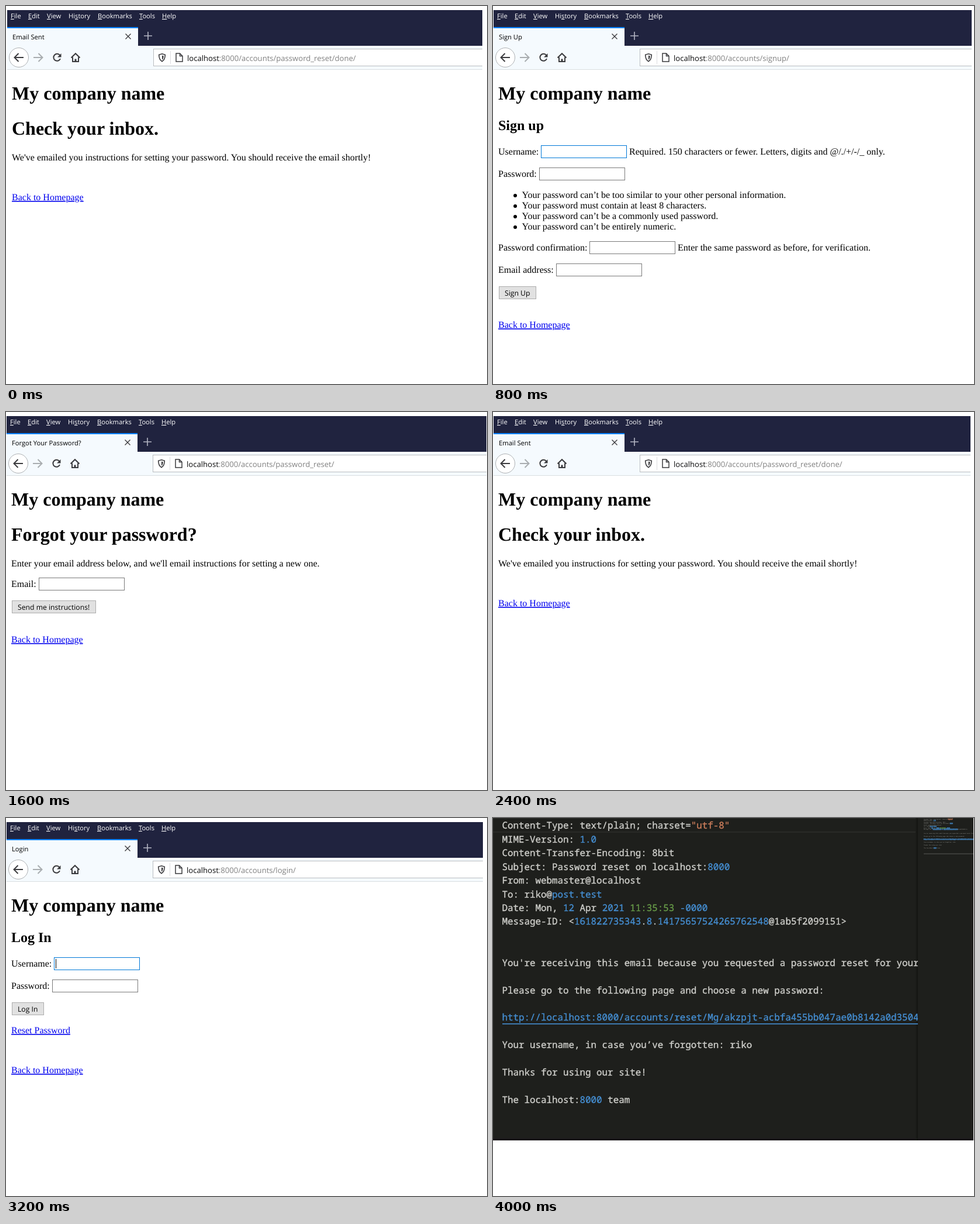
An HTML page that plays this animation: 823 px wide and 646 px high, repeating every 4.8 s.

```html
<!DOCTYPE html>
<html lang="en">
<head>
<meta charset="utf-8">
<title>Password reset walkthrough</title>
<style>
  html, body { margin: 0; width: 100%; height: 100%; overflow: hidden; background: #fff; }
  svg { display: block; width: 823px; height: 646px; }
  text { white-space: pre; text-rendering: geometricPrecision; }
  .ui { font-family: "Open Sans", "Noto Sans", sans-serif; }
  .page { font-family: "Liberation Serif", "Times New Roman", serif; }
  .mono { font-family: "Noto Sans Mono", "DejaVu Sans Mono", monospace; }
  .bold { font-weight: bold; }
  .key, .link { text-decoration: underline; }
  .link { fill: #00e; }
  .icon { fill: none; stroke: #3b3b3e; stroke-width: 2; }
</style>
</head>
<body>
<svg id="stage" viewBox="0 0 823 646" xmlns="http://www.w3.org/2000/svg"></svg>
<script>
const STEP = 800;

const rect = (x, y, w, h, fill, stroke = 'none') =>
  `<rect x="${x}" y="${y}" width="${w}" height="${h}" fill="${fill}" stroke="${stroke}"/>`;
const text = (x, y, size, str, cls = 'page', fill = '#000') =>
  `<text x="${x}" y="${y}" font-size="${size}" class="${cls}" fill="${fill}">${str}</text>`;
const path = (d, attrs = '') => `<path class="icon" d="${d}" ${attrs}/>`;
const tint = (color, str) => `<tspan fill="${color}" stroke="${color}">${str}</tspan>`;

// Page elements
const para = (y, str, x = 9) => text(x, y, 16, str);
const link = (y, str) => `<text x="9" y="${y}" font-size="16" class="page link">${str}</text>`;
const home = y => link(y, 'Back to Homepage');
const h1 = (y, str) => text(9, y, 32, str, 'page bold');
const h2 = str => text(9, 212, 24, str, 'page bold');
const input = (x, y, stroke = '#7a7a7a') => rect(x + .5, y + .5, 146, 21, '#fff', stroke);
const button = (y, w, str) =>
  rect(10.5, y + .5, w - 1, 21, '#e1e1e1', '#adadad') + text(20, y + 16, 12.2, str, 'ui');
const bullet = (y, str) => `<circle cx="38" cy="${y - 4}" r="3"/>` + para(y, str, 49.5);
const logins = () =>
  para(254, 'Username:') + input(82, 238, '#0078d7') + para(292, 'Password:') + input(79, 276);

const MENU = [
  [7, '', 'F', 'ile'], [37, '', 'E', 'dit'], [69, '', 'V', 'iew'], [106, 'Hi', 's', 'tory'],
  [156, '', 'B', 'ookmarks'], [227, '', 'T', 'ools'], [266, '', 'H', 'elp']
];

function icons() {
  return '<circle cx="21" cy="88" r="16.5" fill="#fff" stroke="#adb0b3"/>' +
    path('M29 88H14M20.5 81L13.5 88L20.5 95') +
    path('M46 88H61M54.5 81L61.5 88L54.5 95', 'style="stroke:#a9adb0"') +
    path('M91.2 84.2A6 6 0 1 0 92 90') +
    path('M93.5 81V87.5H87Z', 'style="fill:#3b3b3e;stroke:none"') +
    path('M110.5 88.5L118 81.2L125.5 88.5M113 87.5V95H123V87.5') +
    path('M118 95V90.5', 'style="stroke-width:3"') +
    path('M266 81.8L271.3 83.3C271.3 89 270 92.5 266 94.8C262 92.5 260.7 89 260.7 83.3Z',
      'style="stroke-width:1.6"') +
    path('M266 84.5V92C268 90.5 268.7 88 268.7 85.2Z', 'style="fill:#3b3b3e;stroke:none"') +
    path('M290 81H296.5L301 85.5V95H290ZM296.5 81V85.5H301', 'style="stroke-width:1.5"') +
    path('M203.5 47.5L212.5 56.5M212.5 47.5L203.5 56.5', 'style="stroke-width:1.4"') +
    path('M235 51H249M242 44V58', 'style="stroke:#b4b6c4;stroke-width:1.6"');
}

function browser({ title, url, right, shift = 0, body }) {
  const r = right - shift;
  const menu = MENU.map(([x, pre, key, post]) =>
    text(x, 21, 11.15, `${pre}<tspan class="key">${key}</tspan>${post}`, 'ui', '#fff')).join('');
  return `<g transform="translate(${shift})">` +
    rect(1, 7, r - 1, 61, '#20233f') +
    rect(1, 36, 224, 32, '#f5fafe') + rect(1, 36, 224, 2, '#0a84ff') +
    rect(1, 68, r - 1, 40, '#f5fafe') + rect(1, 108, r - 1, 1, '#d9dee1') +
    rect(251, 73, r - 251, 30, '#b9bcbf') + rect(252, 74, r - 252, 28, '#fff') +
    rect(280, 77, 1, 22, '#dcdcde') +
    menu + text(10, 57, 11.2, title, 'ui') + icons() +
    text(309, 94, 13.08, `localhost<tspan fill="#818181">:8000/accounts/${url}/</tspan>`, 'ui', '#0c0c0d') +
    h1(160, 'My company name') + body + '</g>';
}

const sent = (right, shift) => browser({
  title: 'Email Sent', url: 'password_reset/done', right, shift,
  body: h1(220, 'Check your inbox.') +
    para(264, "We've emailed you instructions for setting your password. You should receive the email shortly!") +
    home(332)
});

const signup = () => browser({
  title: 'Sign Up', url: 'signup', right: 819,
  body: h2('Sign up') + logins() +
    para(254, 'Required. 150 characters or fewer. Letters, digits and @/./+/-/_ only.', 233) +
    bullet(328, 'Your password can’t be too similar to your other personal information.') +
    bullet(346, 'Your password must contain at least 8 characters.') +
    bullet(364, 'Your password can’t be a commonly used password.') +
    bullet(382, 'Your password can’t be entirely numeric.') +
    para(418, 'Password confirmation:') + input(165, 402) +
    para(418, 'Enter the same password as before, for verification.', 316) +
    para(456, 'Email address:') + input(108, 440) +
    button(479, 64, 'Sign Up') + home(550)
});

const forgot = () => browser({
  title: 'Forgot Your Password?', url: 'password_reset', right: 822,
  body: h1(220, 'Forgot your password?') +
    para(264, "Enter your email address below, and we'll email instructions for setting a new one.") +
    para(299, 'Email:') + input(56, 283) +
    button(322, 144, 'Send me instructions!') + home(394)
});

const login = () => browser({
  title: 'Login', url: 'login', right: 816,
  body: h2('Log In') + logins() + rect(85, 241, 1, 16, '#000') +
    button(315, 55, 'Log In') + link(368, 'Reset Password') + home(436)
});

// Email in a code editor
const BLUE = '#458fd3';
const blue = str => tint(BLUE, str);
const MAIL = [
  `Content-Type: text/plain; charset=${tint('#ce7f5c', '"utf-8"')}`,
  `MIME-Version: ${blue('1.0')}`,
  'Content-Transfer-Encoding: 8bit',
  `Subject: Password reset on localhost:${blue('8000')}`,
  'From: webmaster@localhost',
  `To: riko@${blue('post.test')}`,
  `Date: Mon, ${blue('12')} Apr ${blue('2021')} ${tint('#679b48', '11:35:53')} ${blue('-0000')}`,
  `Message-ID: &lt;${blue('161822735343')}.${blue('8')}.${blue('14175657524265762548')}@1ab5f2099151&gt;`,
  '', '',
  "You're receiving this email because you requested a password reset for your",
  '',
  'Please go to the following page and choose a new password:',
  '',
  blue('http://localhost:8000/accounts/reset/Mg/akzpjt-acbfa455bb047ae0b8142a0d3504'),
  '',
  'Your username, in case you’ve forgotten: riko',
  '',
  'Thanks for using our site!',
  '',
  `The localhost:${blue('8000')} team`
];

const mail = (x, y, size, pitch) =>
  MAIL.map((row, i) => row && text(x, y + i * pitch, size, row, 'mono', '#d0d0cc')).join('');

const editor = () =>
  '<clipPath id="pane"><rect width="727" height="551"/></clipPath>' +
  '<clipPath id="map"><rect x="727" width="95" height="551"/></clipPath>' +
  rect(0, 0, 822, 551, '#1e1f1c') + rect(0, 547, 822, 4, '#1a181a') +
  rect(0, 0, 727, 1, '#292a27') + rect(0, 23, 727, 2, '#292a27') +
  rect(723, 0, 2, 551, '#1a1b18') + rect(725, 0, 2, 551, '#151613') +
  `<g clip-path="url(#pane)" stroke="#d0d0cc" stroke-width=".35">${mail(15.5, 18.4, 15.85, 23.43)}</g>` +
  rect(16, 351, 711, 1.6, BLUE) +
  `<g clip-path="url(#map)" opacity=".75">${mail(737, 2.8, 2.03, 2.46)}</g>` +
  rect(737, 60.5, 85, 1.5, '#454643');

const scenes = [sent(815, 1), signup(), forgot(), sent(817, 0), login(), editor()];
const stage = document.getElementById('stage');
stage.innerHTML = scenes.map(s => `<g class="scene" opacity="0">${s}</g>`).join('');

const count = scenes.length;
stage.querySelectorAll('.scene').forEach((scene, i) => {
  const show = scene.animate([
    { opacity: 1, offset: 0, easing: 'step-end' },
    { opacity: 0, offset: 1 / count, easing: 'step-end' },
    { opacity: 0, offset: 1 }
  ], { duration: STEP * count, delay: STEP * (i ? i - count : 0), iterations: Infinity });
  show.startTime = document.timeline.currentTime;
});
</script>
</body>
</html>
```
